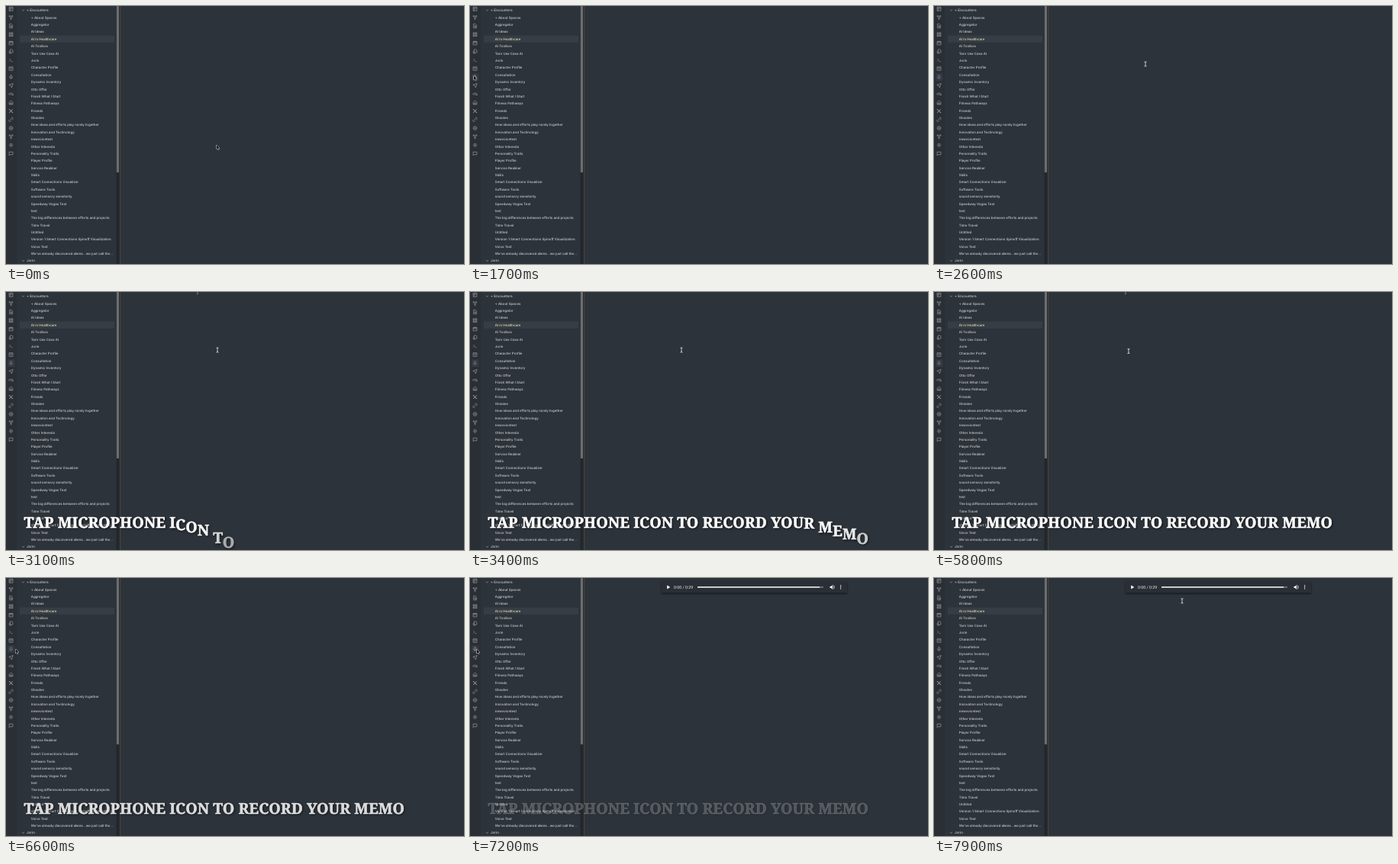
Animation, 600 px wide and 338 px high, one loop 8000 ms. Source, as an HTML page with a canvas:

```html
<!DOCTYPE html>
<html lang="en">
<head>
<meta charset="utf-8">
<title>Voice memo demo</title>
<style>
html, body { margin: 0; width: 100%; height: 100%; overflow: hidden; background: #2d333a; }
canvas { display: block; }
</style>
</head>
<body>
<canvas id="stage" width="600" height="338"></canvas>
<script>
const ctx = document.getElementById('stage').getContext('2d');
const LOOP = 8000;
const UI = 'Inter, "Open Sans", sans-serif';
const CAPTION = 'TAP MICROPHONE ICON TO RECORD YOUR MEMO';
const CAPTION_FONT = 'bold 19.7px "Noto Serif", serif';
const MIC = 8, SELECTED = 3;

const notes = `+ About Spaces|Aggregator|AI Ideas|AI in Healthcare|AI Toolbox|Tarn Use Case AI|Jorin
Character Profile|Consultation|Dynamic Inventory|Otto Offer|Finish What I Start|Fitness Pathways
Friends|Glosdex|How ideas and efforts play nicely together|Innovation and Technology
newvoicetest|Other Interests|Personality Traits|Player Profile|Service Realiner|Skills
Smart Connections Visualizer|Software Tools|sound sensory sensitivity|Speedway Vegas Test|test
The big differences between efforts and projects|Time Travel|Untitled
Version 1 Smart Connections Spinoff Visualization|Voice Test
We've already discovered aliens...we just call the...`.split(/[|\n]/);

// Ribbon icons on a 24-unit grid
const fork = 'M6 3a3 3 0 1 0 .1 0zM18 3a3 3 0 1 0 .1 0zM12 16a3 3 0 1 0 .1 0zM6 9l6 4 6-4M12 13v3';
const icons = [
  'M3 3h18v18H3zM3 9h18M9 9v12',
  fork,
  'M5 2h9l5 5v15H5zM12 11a3 3 0 1 0 .1 0zM14 16l2 2',
  'M3 3h7v7H3zM14 3h7v7h-7zM3 14h7v7H3zM14 14h7v7h-7z',
  'M3 5h18v16H3zM3 10h18M8 2v5M16 2v5',
  'M8 2h9l4 4v11H8zM4 8v13h11',
  'M4 6l6 6-6 6M12 19h8',
  'M3 4h18v17H3zM3 9h18M12 12v6',
  'M9 5a3 3 0 0 1 6 0v6a3 3 0 0 1-6 0zM5 10v2a7 7 0 0 0 14 0v-2M12 19v3',
  'M22 2L15 22l-4-9-9-4z',
  'M8 7l-7 5 7 5M22 6l-9 12M12 7a2 2 0 1 0 .1 0zM21 14a2 2 0 1 0 .1 0z',
  'M3 11l9-8 9 8v10H3zM9 21v-7h6v7',
  'M4 4l16 16M20 4L4 20M3 6l3-3M18 21l3-3',
  'M9 15l6-6M11 6l3-3a5 5 0 0 1 7 7l-3 3M13 18l-3 3a5 5 0 0 1-7-7l3-3',
  'M12 3a9 9 0 1 0 .1 0zM12 8a4 4 0 1 0 .1 0z',
  fork,
  'M6 5h6a7 7 0 0 1 0 14H6M2 12h11M10 9l3 3-3 3',
  'M3 4h18v13H9l-6 4z'
].map(d => new Path2D(d));

const arrow = new Path2D('M0 0V5.4L1.3 4.2 2.2 6.3 3.1 5.9 2.2 3.9H3.9Z');
const ibeam = new Path2D('M-1.5 -3.2Q0 -3.2 0 -2.2Q0 -3.2 1.5 -3.2M0 -2.4V2.4M-1.5 3.2Q0 3.2 0 2.2Q0 3.2 1.5 3.2');

// Pointer stops: time, x, y
const stops = [
  [0, 276, 182], [850, 276, 182], [1700, 5, 91.5], [2300, 5, 91.5], [2600, 277, 76],
  [5650, 277, 76], [6500, 12.5, 93], [6650, 12.5, 93], [6950, 8.5, 93.5],
  [7300, 9, 93.5], [7850, 325, 30], [LOOP, 325, 30]
];

const clamp = v => Math.min(1, Math.max(0, v));
const smooth = u => u * u * (3 - 2 * u);

function rect(color, x, y, w, h) {
  ctx.fillStyle = color;
  ctx.fillRect(x, y, w, h);
}

function text(str, x, y, color, font) {
  ctx.font = font;
  ctx.fillStyle = color;
  ctx.fillText(str, x, y);
}

function at(x, y, scale, paint) {
  ctx.save();
  ctx.translate(x, y);
  ctx.scale(scale, scale);
  paint();
  ctx.restore();
}

function strokePath(path, color, width) {
  ctx.strokeStyle = color;
  ctx.lineWidth = width;
  ctx.stroke(path);
}

function drawRibbon(t) {
  rect('#2a2f35', 0, 0, 14, 338);
  const recording = t >= 2100 && t < 7000;
  const hover = t >= 1600 && t < 2450 || t >= 6450 && t < 7350;
  if (hover || recording) rect('#343a43', 2, 88.5, 9.5, 9.5);
  icons.forEach((icon, i) => at(3.3, 0.6 + i * 11.15, 0.27, () =>
    strokePath(icon, i === MIC && recording ? '#8d8b9b' : '#b0b4b7', i === 12 ? 3.6 : 2)));
}

function drawFolder(name, y) {
  at(22.5, y, 1, () => strokePath(new Path2D('M-1.3 -.7L0 .7 1.3 -.7'), '#a8abad', 0.7));
  text(name, 27, y + 1.6, '#cccdcc', `500 4.5px ${UI}`);
}

function drawSidebar() {
  rect('#363d44', 18, 38.5, 124, 9.3);
  drawFolder('+ Encounters', 5.5);
  notes.forEach((name, i) =>
    text(name, 32.8, 16.7 + i * 9.38, i === SELECTED ? '#e9dcb8' : '#cccdcc', `500 4.43px ${UI}`));
  drawFolder('Jorin', 333.8);
  rect('#24282d', 144.3, 0, 4.7, 338);
  rect('#6c6e70', 144.8, 0, 3.2, 218);
  rect('#4b4541', 149, 0, 1, 338);
}

function drawPlayer() {
  ctx.save();
  ctx.shadowColor = '#0008';
  ctx.shadowBlur = 2;
  ctx.shadowOffsetY = 1;
  rect('#2a2f36', 251, 4, 243, 15.5);
  ctx.restore();
  ctx.fillStyle = '#fff';
  ctx.fill(new Path2D('M258.2 9.4v5.2l4-2.6z'));
  text('0:00 / 0:29', 267, 13.9, '#f2f2f2', '5.3px Roboto, sans-serif');
  rect('#777b80', 298, 11.2, 165, 1.6);
  rect('#e2e3e4', 298, 11.2, 160, 1.6);
  ctx.fillStyle = '#fff';
  ctx.fill(new Path2D('M471.5 11h1.4l1.8-1.8v5.6l-1.8-1.8h-1.4z'));
  strokePath(new Path2D('M475.4 10.8a1.4 1.4 0 0 1 0 2.4M475.4 9.4a2.7 2.7 0 0 1 0 5.2'), '#fff', 0.6);
  for (const y of [9.9, 12, 14.1]) {
    ctx.beginPath();
    ctx.arc(485.6, y, 0.7, 0, 7);
    ctx.fill();
  }
}

// Letters rise into place one after another, then the whole line fades
function drawCaption(t) {
  if (t < 2719 || t > 7400) return;
  const fade = clamp((7400 - t) / 950);
  const settled = 14.2 + (t - 3100) / 16.8;
  ctx.save();
  ctx.font = CAPTION_FONT;
  ctx.fillStyle = ctx.strokeStyle = '#fff';
  ctx.lineWidth = 0.5;
  ctx.lineJoin = 'round';
  [...CAPTION].forEach((ch, i) => {
    const lag = Math.max(0, i - settled);
    if (lag > 8.5) return;
    const x = 23.5 + ctx.measureText(CAPTION.slice(0, i + 1)).width - ctx.measureText(ch).width;
    const y = 308.6 + 1.256 * lag ** 1.6;
    ctx.globalAlpha = fade * (1 - (lag / 8.5) ** 4);
    ctx.shadowColor = '#000c';
    ctx.shadowBlur = 3;
    ctx.shadowOffsetX = 1;
    ctx.shadowOffsetY = 1.5;
    ctx.fillText(ch, x, y);
    ctx.shadowColor = 'transparent';
    ctx.strokeText(ch, x, y);
  });
  ctx.restore();
}

function drawCaret(t) {
  const on = t < 2800 ? (t + 900) % 1000 < 500 : t < 6400 && (t - 2800) % 1000 < 500;
  if (on) rect('#8f959b', 250.5, 0, 0.9, 3.5);
}

function drawPointer(t) {
  const k = stops.findIndex(s => s[0] > t);
  const [t0, x0, y0] = stops[k - 1], [t1, x1, y1] = stops[k];
  const u = smooth((t - t0) / (t1 - t0));
  const x = x0 + (x1 - x0) * u, y = y0 + (y1 - y0) * u;
  at(x, y, 1, () => {
    if (x > 150 && t > 2300) {
      strokePath(ibeam, '#1b1e22', 1.8);
      strokePath(ibeam, '#f4f4f4', 0.9);
    } else {
      strokePath(arrow, '#e6e4e6', 1);
      ctx.fillStyle = '#111';
      ctx.fill(arrow);
    }
  });
}

function draw(t) {
  ctx.textRendering = 'geometricPrecision';
  rect('#2d333a', 0, 0, 600, 338);
  drawRibbon(t);
  drawSidebar();
  drawCaret(t);
  if (t >= 7000) drawPlayer();
  drawCaption(t);
  drawPointer(t);
}

const start = performance.now();
function tick() {
  draw((performance.now() - start) % LOOP);
  requestAnimationFrame(tick);
}
tick();
</script>
</body>
</html>
```
